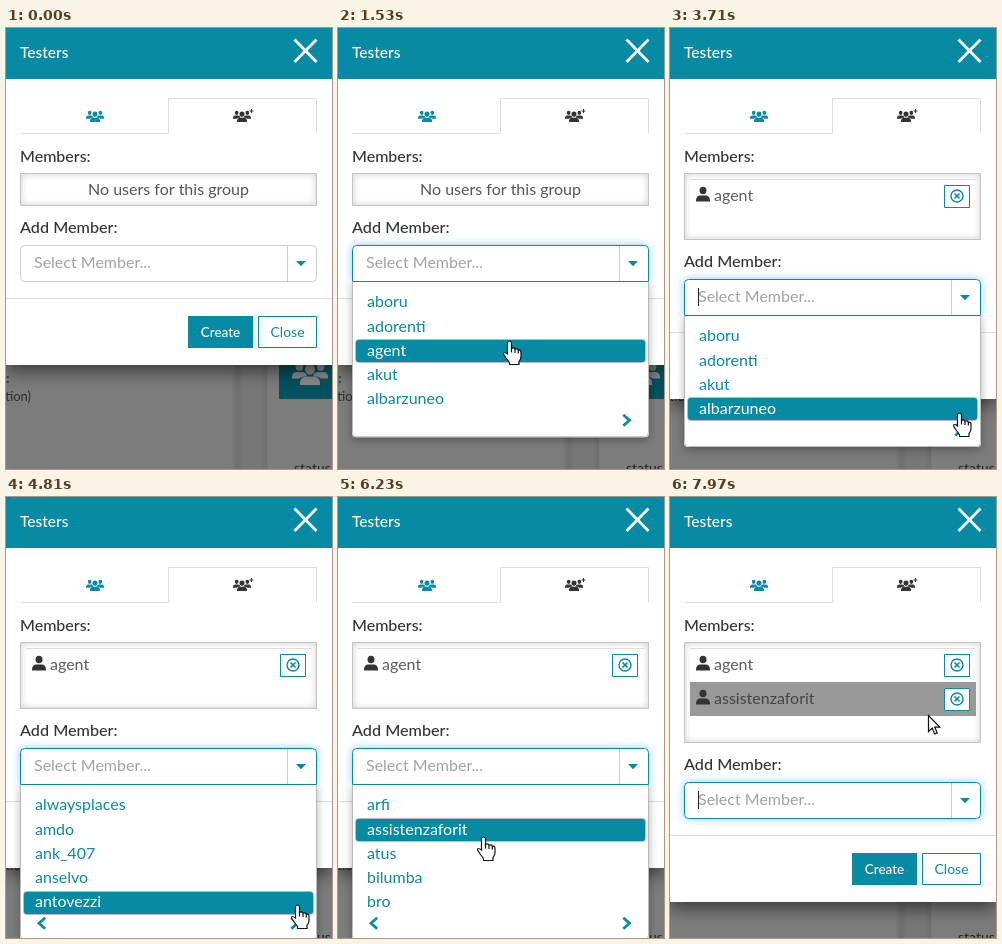
An HTML page with a canvas for the animation above (8 s loop, 326 by 441 pixels).

```html
<!DOCTYPE html>
<html lang="en">
<head>
<meta charset="utf-8">
<title>Group members</title>
<style>
html, body { margin: 0; width: 326px; height: 441px; overflow: hidden; }
canvas { display: block; }
</style>
</head>
<body>
<canvas id="stage" width="326" height="441"></canvas>
<script>
const c = document.getElementById('stage').getContext('2d');
const TEAL = '#078aa3', LINE = '#ddd', DARK = '#333';
const LOOP = 8000, ROW = 34, ITEM = 24.25;

const pages = [
  ['aboru', 'adorenti', 'agent', 'akut', 'albarzuneo'],
  ['alwaysplaces', 'amdo', 'ank_407', 'anselvo', 'antovezzi'],
  ['arfi', 'assistenzaforit', 'atus', 'bilumba', 'bro']
];
const members = ['agent', 'assistenzaforit'];

// Pointer path: time, x, y
const path = [
  [130, 262, 397], [750, 292, 234], [980, 292, 234], [1500, 171, 314],
  [2080, 171, 314], [2860, 291, 270], [3340, 291, 270], [3700, 289, 386],
  [3870, 288, 402], [4730, 288, 402], [4810, 291, 409], [5040, 288, 421],
  [5640, 288, 421], [6220, 145, 341], [6380, 144, 333], [7510, 144, 333],
  [7960, 258, 218]
];

const within = (t, a, b) => t >= a && t < b;

function pointerAt(t) {
  let i = path.findIndex(p => p[0] > t);
  if (i < 0) i = path.length;
  const a = path[i - 1], b = path[i] || a;
  let k = b === a ? 0 : (t - a[0]) / (b[0] - a[0]);
  k = k * k * (3 - 2 * k);
  return { x: a[1] + (b[1] - a[1]) * k, y: a[2] + (b[2] - a[2]) * k };
}

function rect(x, y, w, h, fill) {
  c.fillStyle = fill;
  c.fillRect(x, y, w, h);
}

function frame(x, y, w, h, color, r = 0) {
  c.beginPath();
  c.roundRect(x + .5, y + .5, w - 1, h - 1, r);
  c.strokeStyle = color;
  c.lineWidth = 1;
  c.stroke();
}

function text(s, x, y, color, size = 16, weight = 400, align = 'left') {
  c.font = `${weight} ${size}px Lato, "Open Sans", sans-serif`;
  c.textAlign = align;
  c.fillStyle = color;
  c.fillText(s, x, y);
}

function line(points, color, width) {
  c.beginPath();
  points.forEach(([x, y]) => c.lineTo(x, y));
  c.strokeStyle = color;
  c.lineWidth = width;
  c.stroke();
}

function shadow(color, blur, y = 0) {
  c.shadowColor = color;
  c.shadowBlur = blur;
  c.shadowOffsetY = y;
}
const noShadow = () => shadow('transparent', 0);

function person(x, y, s, color) {
  c.fillStyle = color;
  c.beginPath();
  c.ellipse(x, y - 4 * s, 3.5 * s, 3.8 * s, 0, 0, 7);
  c.fill();
  c.beginPath();
  c.moveTo(x - 7 * s, y + 7 * s);
  c.bezierCurveTo(x - 7 * s, y + 2 * s, x - 5 * s, y + 1.2 * s, x - 2.5 * s, y + s);
  c.lineTo(x + 2.5 * s, y + s);
  c.bezierCurveTo(x + 5 * s, y + 1.2 * s, x + 7 * s, y + 2 * s, x + 7 * s, y + 7 * s);
  c.fill();
}

function people(x, y, s, color, gap) {
  person(x - 5.3 * s, y - s, .54 * s, color);
  person(x + 5.3 * s, y - s, .54 * s, color);
  person(x, y + .8 * s, .95 * s, gap);
  person(x, y + s, .72 * s, color);
}

function chevron(x, y, dir) {
  line([[x - 3.2 * dir, y - 5.5], [x + 3 * dir, y], [x - 3.2 * dir, y + 5.5]], TEAL, 2.8);
}

function backdrop() {
  rect(0, 0, 326, 441, '#7c7c7c');
  const g = c.createLinearGradient(225, 0, 266, 0);
  [[0, '#7c7c7c'], [.14, '#6f6f6f'], [.3, '#777'], [.72, '#777'], [.86, '#6f6f6f'], [.9, '#7c7c7c']]
    .forEach(s => g.addColorStop(...s));
  rect(225, 0, 41, 441, g);
  text('n:', -8, 355, '#044c59', 14, 700);
  text('ption)', -8, 373, '#2c2c2c', 13);
  rect(273, 320, 53, 51, '#04515f');
  people(304, 345, 2, '#8a8a8a', '#04515f');
  text('status', 288, 445, '#222', 14);
}

function header() {
  rect(0, 0, 326, 51, TEAL);
  text('Testers', 14, 30, '#fff', 15.5, 500);
  line([[288.5, 11.5], [310.5, 34]], '#fff', 2.7);
  line([[310.5, 11.5], [288.5, 34]], '#fff', 2.7);
  line([[14, 105.5], [162.5, 105.5], [162.5, 70.5], [310.5, 70.5], [310.5, 105.5]], LINE, 1);
  people(89, 88, 1, TEAL, '#fff');
  people(236, 88, 1, DARK, '#fff');
  line([[245.5, 81], [245.5, 85]], DARK, 1);
  line([[243.5, 83], [247.5, 83]], DARK, 1);
}

function memberBox(count, hover) {
  const h = count ? 33 + count * ROW : 33;
  text('Members:', 14, 134, DARK, 16, 500);
  c.save();
  c.beginPath();
  c.rect(14, 145, 297, h);
  c.clip();
  shadow('rgba(0,0,0,.8)', 6);
  frame(13, 144, 299, h + 2, '#999');
  noShadow();
  c.restore();
  frame(14, 145, 297, h, '#c4c4c4');
  if (!count) text('No users for this group', 162.5, 167, '#555', 16, 400, 'center');
  for (let i = 0; i < count; i++) {
    const y = 151 + i * ROW;
    if (i === hover) rect(20, y, 286, ROW, '#999');
    else rect(20, y, 286, 1, LINE);
    person(33, y + 15.5, 1, DARK);
    text(members[i], 44, y + 22, i === hover ? '#444' : '#5c5c5c');
    rect(274, y + 6, 26, 23, '#fff');
    frame(274, y + 6, 26, 23, TEAL);
    c.beginPath();
    c.arc(287, y + 17, 6, 0, 7);
    c.strokeStyle = TEAL;
    c.lineWidth = 1.4;
    c.stroke();
    line([[284.5, y + 14.5], [289.5, y + 19.5]], TEAL, 1.6);
    line([[289.5, y + 14.5], [284.5, y + 19.5]], TEAL, 1.6);
  }
}

function selectBox(o, focus, glow, open, caret) {
  const y = 217 + o, corners = open ? [4, 4, 0, 0] : 4;
  text('Add Member:', 14, 205 + o, DARK, 16.2, 500);
  if (glow) shadow('rgba(90,175,230,.65)', 8);
  c.beginPath();
  c.roundRect(14, y, 297, 37, corners);
  c.fillStyle = '#fff';
  c.fill();
  noShadow();
  frame(14, y, 297, 37, focus ? TEAL : '#ccc', corners);
  rect(281, y + 1, 1, 35, '#ccc');
  text('Select Member...', 28, y + 23, '#a2a2a2', 16);
  if (caret) rect(28, y + 9, 1, 18, '#222');
  c.beginPath();
  [[290, y + 16], [300, y + 16], [295, y + 21.3]].forEach(p => c.lineTo(...p));
  c.fillStyle = TEAL;
  c.fill();
}

function footer(o) {
  rect(0, 270 + o, 326, 1, LINE);
  rect(182, 288 + o, 65, 32, TEAL);
  text('Create', 214.5, 309 + o, '#fff', 13.5, 500, 'center');
  frame(252, 288 + o, 59, 32, TEAL);
  text('Close', 281.5, 309 + o, TEAL, 14, 400, 'center');
}

function dropdown(top, items, page, hover, reveal) {
  const h = items.length * ITEM + 34;
  c.save();
  c.beginPath();
  c.rect(0, top, 326, (h + 12) * reveal);
  c.clip();
  c.translate(0, (reveal - 1) * h);
  shadow('rgba(0,0,0,.3)', 9, 3);
  c.beginPath();
  c.roundRect(14, top, 297, h, [0, 0, 4, 4]);
  c.fillStyle = '#fff';
  c.fill();
  noShadow();
  frame(14, top - 1, 297, h + 1, '#bbb', [0, 0, 4, 4]);
  items.forEach((name, i) => {
    const y = top + 8.5 + i * ITEM, on = i === hover;
    if (on) {
      rect(18, Math.round(y) + 1, 289, 22, TEAL);
      frame(17, Math.round(y), 291, 24, '#bbb', 3);
    }
    text(name, 29, Math.floor(y + 17.3), on ? '#fff' : TEAL);
  });
  if (page) chevron(36, top + h - 17, -1);
  chevron(288.5, top + h - 17, 1);
  c.restore();
}

const hand = new Path2D('M-2 0Q0-3 2 0V6Q4.500 4.500 5.500 6.800Q8 5.500 8.800 7.800Q11.500 7 11.500 10V14Q11.500 17 9.500 19V22H0V20Q-4 15-6 11.500Q-6 8.500-2 11.500Z');
const fingers = new Path2D('M2 6V10M5.500 7V10.500M8.800 8V11');
const arrow = new Path2D('M0 0V16L3.700 12.500 6.200 18.500 8.700 17.400 6.200 11.600H11.300Z');

function pointer(p, isHand) {
  c.save();
  c.translate(Math.round(p.x) + .5, Math.round(p.y) + .5);
  c.fillStyle = '#fff';
  c.strokeStyle = '#111';
  c.lineWidth = 1.2;
  const shape = isHand ? hand : arrow;
  c.fill(shape);
  c.stroke(shape);
  if (isHand) c.stroke(fingers);
  c.restore();
}

function draw(t) {
  const count = t < 2080 ? 0 : t < 6850 ? 1 : 2;
  const o = count * ROW, top = 254 + o;
  const page = t < 4340 ? 0 : t < 5440 ? 1 : 2;
  const items = pages[page].filter(n => !count || n !== members[0]);
  const opened = t < 2080 ? 900 : 3360;
  const open = within(t, 900, 2080) || within(t, 3360, 6850);
  const reveal = Math.min(1, (t - opened + 40) / 200);
  const pressed = [1930, 4170, 5290, 6700].some(s => within(t, s, s + 150));
  const caret = [870, 2080, 3340, 6880].some(s => within(t, s, s + 530)) || t >= 7940;
  const p = t < 130 ? null : pointerAt(t);

  backdrop();
  shadow('rgba(0,0,0,.6)', 18, 5);
  rect(0, 0, 326, 337 + o, '#fff');
  noShadow();
  header();
  const row = p && !open && p.x > 20 && p.x < 306 ? Math.floor((p.y - 151) / ROW) : -1;
  memberBox(count, row);
  footer(o);
  selectBox(o, t >= 870, t >= 870 && !pressed, open, caret);
  if (open) {
    const hover = Math.floor((p.y - top - 8.5) / ITEM);
    dropdown(top, items, page, hover, reveal);
  }
  if (p) {
    const onButton = p.x > 281 && p.y > 217 + o && p.y < top;
    pointer(p, open || onButton);
  }
}

function tick(now) {
  draw(now % LOOP);
  requestAnimationFrame(tick);
}
requestAnimationFrame(tick);
</script>
</body>
</html>
```
